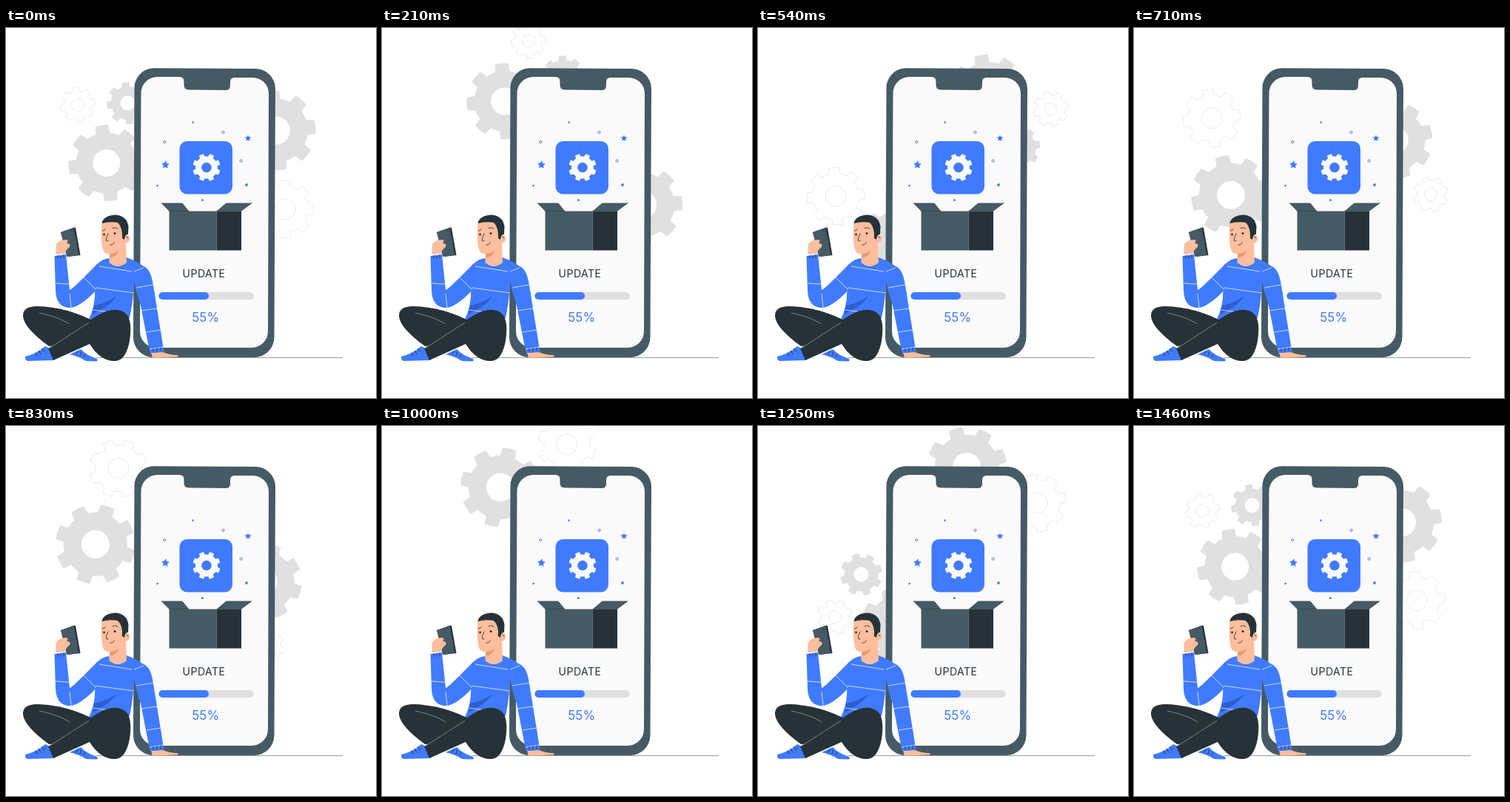
Write an HTML page that moves like this. It is 500x500 px and loops after 1.5 s.

```html
<!DOCTYPE html>
<html lang="en">
<head>
<meta charset="utf-8">
<title>Update</title>
<style>
  html, body { margin: 0; width: 100%; height: 100%; overflow: hidden; background: #fff; }
  svg { display: block; width: 100%; height: 100%; }
  text { font-family: Inter, sans-serif; text-anchor: middle; }
  .blue { fill: #407bff; }
  .slate { fill: #455a64; }
  .dark { fill: #263238; }
  .skin { fill: #ffbe9d; }
  .grey { fill: #e0e0e0; }
  .outline { fill: none; stroke: #e8e8e8; stroke-width: .8; }
  .ring { fill: none; stroke: #407bff; stroke-width: 1; }
  .pen { fill: none; stroke: #263238; stroke-width: .9; stroke-linecap: round; }
  .stripe { fill: none; stroke: #fff; stroke-width: .7; }
</style>
</head>
<body>
<svg viewBox="0 0 500 500">
  <g id="gears"></g>

  <path d="M122 445.500H455" stroke="#7d868a" stroke-width=".8"/>

  <g id="phone">
    <path class="slate" d="M173.500 81A26.500 26.500 0 0 1 200 54.300L337 55A27 27 0 0 1 364 82L362.500 418A27 27 0 0 1 335.500 445H199A27 27 0 0 1 172 418Z"/>
    <path fill="#fafafa" d="M182.500 88A22 22 0 0 1 204.500 66H234Q240.500 66 240.500 72V77Q240.500 83.500 247 83.500L297 84Q303 84 303 78V73Q303 67 309 67H333.500A21.500 21.500 0 0 1 355 88.500L354 410A22 22 0 0 1 332 432H203A22 22 0 0 1 181 410Z"/>
    <rect class="blue" x="234.500" y="153" width="71.500" height="71.500" rx="10"/>
    <g id="sparks" class="blue">
      <circle cx="252.500" cy="127.500" r="1.300"/>
      <circle cx="204.500" cy="213" r="1.300"/>
      <circle cx="265.500" cy="232.500" r="1.500"/>
      <circle class="ring" cx="214.300" cy="154" r="1.500"/>
      <circle class="ring" cx="293.500" cy="141" r="1.600"/>
      <circle class="ring" cx="317.700" cy="179.500" r="1.600"/>
    </g>
    <path class="slate" d="M220.500 247.500H284.500V300.500H220.500ZM209.500 236.500H238L247 247.500H220.500ZM284.500 247.500L297.500 236.500H333L318 247.500Z"/>
    <path class="dark" d="M284.500 247.500H318V300.500H284.500Z"/>
    <path d="M220.500 247.500H247L238 236.500M284.500 247.500H318" fill="none" stroke="#263238" stroke-width=".4"/>
    <text class="dark" x="267.500" y="337" font-size="14" letter-spacing=".5">UPDATE</text>
    <rect class="grey" x="206.500" y="357" width="128" height="10" rx="5"/>
    <rect class="blue" x="206.500" y="357" width="67.500" height="10" rx="5"/>
    <text class="blue" x="269.700" y="397" font-size="17">55%</text>
  </g>

  <g id="man">
    <path class="skin" d="M196 439L212 438Q222 442 231 442Q235 443 231 444.500L198 445.500Z"/>
    <path class="blue" d="M65.500 308L81 306L86 354Q88 355 123 319L130 345Q105 375 88 378Q68 379 67 355Z"/>
    <path class="blue" d="M122 320Q130 312 139 311Q150 326 163 310Q176 315 186 322L173 345Q172 368 167 392L110 398Q122 375 120 350Z"/>
    <path class="blue" d="M172 335Q174 319 186 322Q196 326 199 348L213.500 437.500L194.500 439L182 375Q174 352 172 335Z"/>
    <path fill="#2d5fce" d="M119 375Q136 372 149 362Q141 376 117 387Z"/>
    <path class="stripe" d="M126 322L170 329M121 351L173 358M118 381L140 384M67 345L85 346M86 359L88 378M105 337L122 354M176 351L199 347M182 382L205 379M190 411L209 408M194 434L213 431M173 329L186 324"/>
    <path class="pen" stroke-width=".6" d="M70 308V311M74 308V311M78 307V310M199 433V437M204 432V437M209 432V436"/>

    <path class="blue" d="M26 444Q42 440 53 430L59 433L65 449L29 450Q25 448 26 444ZM86 441L101 434Q108 442 122 446.500Q126 449 122 450.500L108 450Q99 444 86 441Z"/>
    <path class="pen" d="M40 439L42 443M44 436L47 441M48 433L52 438M97 437L95 441M102 438L100 443M107 441L105 445"/>
    <path class="dark" d="M23 390Q22 376 42 376Q82 377 118 396L112 426L58 430Q25 406 23 390Z"/>
    <path class="dark" d="M57 433L124 388Q150 374 163 387Q171 397 167 423Q162 449 148 450Q128 451 113 427L64 449Z"/>
    <path class="stripe" d="M45 385Q70 390 86 400M58 433L112 398" stroke-opacity=".55"/>

    <path class="skin" d="M130 261C128 275 128 290 131 299Q133 306 140 305L139.500 317Q151 327 163 317L162 291Q168 289 167 283Q166 278 160 281L157 258Z"/>
    <path fill="#eb996e" d="M140 305Q148 305 153 300Q150 309 140 311Z"/>
    <path class="dark" d="M129.500 264Q131 254 147 252.500Q163 253 165.500 268L165 279Q161 278 160 286L157 284Q158 270 151 263Q140 261 129.500 264Z"/>
    <path class="pen" d="M130.500 274L134 272M144 270.500Q148 268.500 151 271M138 278Q134 286 136 288L138 287.500M141 293Q145 294 146 290M163 282L165 284"/>
    <circle class="dark" cx="132.500" cy="279" r="1.400"/>
    <circle class="dark" cx="147" cy="277.500" r="1.500"/>

    <path class="dark" d="M74 276L92 269.500L94 270L100.500 307L84 309Z"/>
    <path class="slate" d="M74 276L91.500 270L98.500 307L82 309Z"/>
    <circle class="dark" cx="89" cy="274.500" r="1"/>
    <path class="skin" d="M67.500 306V293Q71 286 82 286Q85 288 82 291Q88 291 86 296Q81 299 80 305Z"/>
  </g>
</svg>
<script>
const $ = id => document.getElementById(id);
const CENTER = [245, 174.5];

function addPath(parent, d, attrs) {
  const path = document.createElementNS("http://www.w3.org/2000/svg", "path");
  path.setAttribute("d", d);
  for (const name in attrs) path.setAttribute(name, attrs[name]);
  parent.append(path);
}

function polar(x, y, r, deg) {
  const a = deg * Math.PI / 180;
  return (x + r * Math.cos(a)).toFixed(2) + " " + (y + r * Math.sin(a)).toFixed(2);
}

// Eight trapezoid teeth around a round body with a round hole.
function gear(x, y, r, hole, phase) {
  const body = r * 0.8, tip = 10, base = 13.5;
  let d = "";
  for (let a = phase; a < phase + 360; a += 45) {
    d += (d ? `A${body} ${body} 0 0 1 ` : "M") + polar(x, y, body, a - base)
      + "L" + polar(x, y, r, a - tip)
      + `A${r} ${r} 0 0 1 ` + polar(x, y, r, a + tip)
      + "L" + polar(x, y, body, a + base);
  }
  d += `A${body} ${body} 0 0 1 ` + polar(x, y, body, phase - base) + "Z";
  return d + `M${x - hole} ${y}a${hole} ${hole} 0 1 0 ${2 * hole} 0a${hole} ${hole} 0 1 0 ${-2 * hole} 0Z`;
}

function star(x, y, r, tilt) {
  const points = Array.from({ length: 10 }, (_, i) =>
    polar(x, y, i % 2 ? r * 0.48 : r, i * 36 - 90 + tilt));
  return "M" + points.join("L") + "Z";
}

[
  ["grey", 135.8, 182.5, 51.5, 18.5, 38],
  ["grey", 164.5, 101.5, 28.5, 10, 39],
  ["grey", 364.8, 138.6, 54, 19, 39.5],
  ["outline", 97, 104, 23.5, 8.5, 35],
  ["outline", 377, 245, 39, 14, 0],
].forEach(([kind, ...shape]) =>
  addPath($("gears"), gear(...shape), { class: kind, "fill-rule": "evenodd" }));

addPath($("phone"), gear(271, 188.5, 18.8, 6.8, 22.5), { fill: "#fafafa", "fill-rule": "evenodd" });
[[215.5, 185, 5.8, 5], [327, 149, 4.6, 0], [325, 212, 2.8, 10]].forEach(s => addPath($("sparks"), star(...s)));

// Turn of the gear ring: [step, degrees], 36 steps per loop.
const LOOP = 1500, STEP = LOOP / 36;
const TURN = [[0, 0], [5, 47.8], [13, 131.2], [20, 203.4], [24, 243.8], [30, 303.9], [35, 356], [36, 360]];

function angleAt(step) {
  const i = TURN.findIndex(key => key[0] > step);
  const [s0, a0] = TURN[i - 1], [s1, a1] = TURN[i];
  return a0 + (a1 - a0) * (step - s0) / (s1 - s0);
}

function draw() {
  const t = performance.now() % LOOP;
  const step = Math.floor((t + 5) / STEP) % 36;
  $("gears").setAttribute("transform", `rotate(${angleAt(step)} ${CENTER})`);
  requestAnimationFrame(draw);
}
draw();
</script>
</body>
</html>
```
